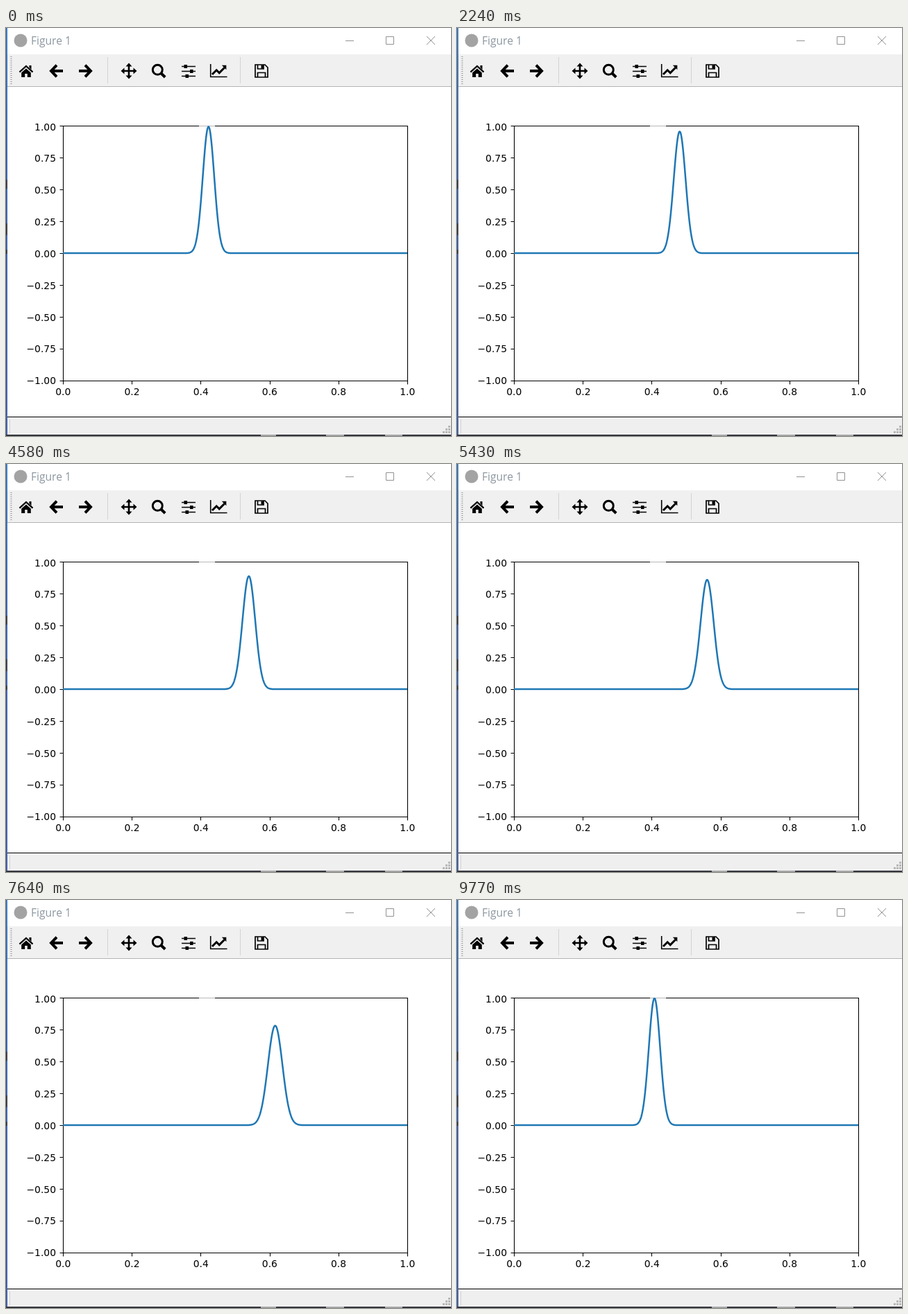
Write an HTML page that moves like this. It is 641 by 589 pixels and loops after 9820 ms.

```html
<!DOCTYPE html>
<html lang="en">
<head>
<meta charset="utf-8">
<title>Figure 1</title>
<style>
  html, body { margin: 0; width: 100%; height: 100%; overflow: hidden; background: #fff; }
  svg { display: block; width: 641px; height: 589px; }
  .title { font: 15.6px "Open Sans", "Noto Sans", sans-serif; fill: #8c969f; }
  #axes text { font: 13.89px "DejaVu Sans", sans-serif; fill: #000; }
  .line { fill: none; stroke: #000; }
</style>
</head>
<body>
<svg viewBox="0 0 641 589">
  <defs>
    <clipPath id="plot"><rect x="82" y="141" width="497" height="369"/></clipPath>
    <linearGradient id="desk" x2="0" y2="1">
      <stop offset="0" stop-color="#3d7cc0"/>
      <stop offset=".3" stop-color="#3a62ac"/>
      <stop offset="1" stop-color="#4260a8"/>
    </linearGradient>
  </defs>

  <!-- desktop behind the window -->
  <rect width="2" height="589" fill="url(#desk)"/>
  <path d="M0 219h2v13h-2zM0 282h2v17h-2zM0 320h2v6h-2z" fill="#3c4048"/>
  <rect x="0" y="587" width="641" height="2" fill="#33353c"/>
  <path d="M367 587h22v2h-22zM461 587h26v2h-26zM546 587h25v2h-25z" fill="#a6a6a6"/>

  <!-- title bar -->
  <rect x="2" width="639" height="587" fill="#fff"/>
  <circle cx="21" cy="18" r="9.5" fill="#a3a3a3"/>
  <text class="title" x="36" y="24">Figure 1</text>
  <path class="line" d="M489 18.5h12M547.5 12.5h11v11h-11zM606 12l12 12M618 12l-12 12" style="stroke:#929292"/>

  <!-- toolbar -->
  <rect x="2" y="38" width="639" height="46" fill="#f0f0f0"/>
  <path class="line" d="M2 84.5h639" style="stroke:#b4b4b4"/>
  <path class="line" d="M7.5 41v40" stroke-dasharray="1 2" style="stroke:#909090;stroke-width:2"/>
  <path class="line" d="M146.5 42v38M337.5 42v38" style="stroke:#d2d2d2"/>

  <path class="line" d="M19.5 63.6L29 55l9.500 8.600" stroke-width="2.300"/>
  <path d="M33.500 54h3v6l-3-3zM22.200 64.500L29 58.400l6.800 6.100V71h-5v-5h-3.600v5h-5z"/>
  <g class="line" stroke-width="4">
    <path d="M73 53.600L65 62l8 8.400M66 62h16"/>
    <path d="M114 53.600l8 8.400-8 8.400M121 62h-16"/>
  </g>
  <path class="line" d="M169 62h16M177 54v16" stroke-width="2.600"/>
  <path d="M177 50.500l4.500 5h-9zM177 73.500l4.500-5h-9zM165.500 62l5-4.500v9zM188.500 62l-5-4.500v9z"/>
  <circle class="line" cx="218.300" cy="60.300" r="7" stroke-width="3"/>
  <path class="line" d="M223.500 65.500l5.700 5.500" stroke-width="4"/>
  <path class="line" d="M253 55.500h20M253 62.500h20M253 69.500h20" stroke-width="1.600"/>
  <path d="M256.500 53h4.500v5h-4.500zM265 60h4.500v5h-4.500zM258.500 67h4.500v5h-4.500z"/>
  <path class="line" d="M294.700 52v18.500h23.800" stroke-width="1.600"/>
  <path class="line" d="M297 67l6.200-6.200 4 4 7.500-7.500" stroke-width="3"/>
  <path d="M310.800 53.800h6.500v6.500z"/>
  <path class="line" d="M359 53h14l4 4v14h-18zM362.500 53v6h8.500v-6M362.500 71v-6.500h11V71" stroke-width="1.700"/>
  <rect x="367.500" y="53.500" width="3" height="5"/>

  <!-- status bar -->
  <rect x="2" y="562" width="639" height="25" fill="#f0eff0"/>
  <path class="line" d="M2 561.500h639"/>
  <path class="line" d="M5.500 565v20" style="stroke:#d4d4d4"/>
  <path d="M637 574h3v3h-3zM633 578h3v3h-3zM637 578h3v3h-3zM629 582h3v3h-3zM633 582h3v3h-3zM637 582h3v3h-3z" fill="#b9b9b9"/>

  <g id="axes"><path class="line" id="frame" stroke-width="1.100"/></g>
  <path class="line" d="M278 141.500h23" style="stroke:#b8b8b8"/>
  <path class="line" id="curve" clip-path="url(#plot)" stroke-width="2.500" stroke-linejoin="round" style="stroke:#1f77b4"/>
</svg>
<script>
const LOOP = 9820;
const LEFT = 82, WIDTH = 496, ZERO = 325.1, UNIT = 183.3;
const axes = document.getElementById('axes');
const curve = document.getElementById('curve');

function label(x, y, anchor, value, digits) {
  const t = document.createElementNS('http://www.w3.org/2000/svg', 'text');
  t.setAttribute('x', x);
  t.setAttribute('y', y);
  t.setAttribute('text-anchor', anchor);
  t.textContent = value.toFixed(digits).replace('-', '\u2212');
  axes.append(t);
}

function drawAxes() {
  let d = 'M82.5 141.5H578.5V509.5H82.5Z';
  for (let i = 0; i <= 5; i++) {
    const x = LEFT + i * WIDTH / 5;
    d += `M${Math.round(x) + .5} 510v4.5`;
    label(x + .3, 530, 'middle', i / 5, 1);
  }
  for (let i = 0; i <= 8; i++) {
    const y = 141.5 + i * 46;
    d += `M82 ${y}h-4.500`;
    label(72, Math.round(147.6 + i * 45.82), 'end', 1 - i / 4, 2);
  }
  document.getElementById('frame').setAttribute('d', d);
}

// The screen refreshes in batches of 16 with uneven 50 / 70 ms holds.
const BATCHES = [50, 1080, 2120, 3160, 4200, 5240, 6270, 7310, 8340, 9370];

function tickAt(t) {
  if (t < 50) return 0;
  const b = BATCHES.findLastIndex(s => t >= s);
  const dt = t - BATCHES[b];
  if (b === 0) return 1 + Math.min(16, Math.floor(dt / 60));
  const rest = dt % 260;
  const holds = [70, b < 5 ? 120 : 140, 190];
  const k = 4 * Math.floor(dt / 260) + holds.filter(h => rest >= h).length;
  return 2 + 16 * b + Math.min(15, k);
}

// Free wave packet: it drifts right and widens while its area stays constant.
function packet(n) {
  const peak = 1 / Math.sqrt(1 + 3.54e-5 * n * n);
  const mid = 280.4 + .807 * n;
  const sigma = 8.2 / peak;
  let d = '';
  for (let x = LEFT; x <= LEFT + WIDTH; x += .5) {
    const z = (x - mid) / sigma;
    const y = ZERO - UNIT * peak * Math.exp(-z * z / 2);
    d += (d ? 'L' : 'M') + x + ' ' + y.toFixed(2);
  }
  return d;
}

let shown = -1;
function draw(t) {
  const tick = tickAt(t);
  if (tick === shown) return;
  shown = tick;
  curve.setAttribute('d', packet(tick < 149 ? tick + 14 : tick - 147));
}

drawAxes();
draw(0);
const start = performance.now();
(function loop() {
  draw((performance.now() - start) % LOOP);
  requestAnimationFrame(loop);
})();
</script>
</body>
</html>
```
